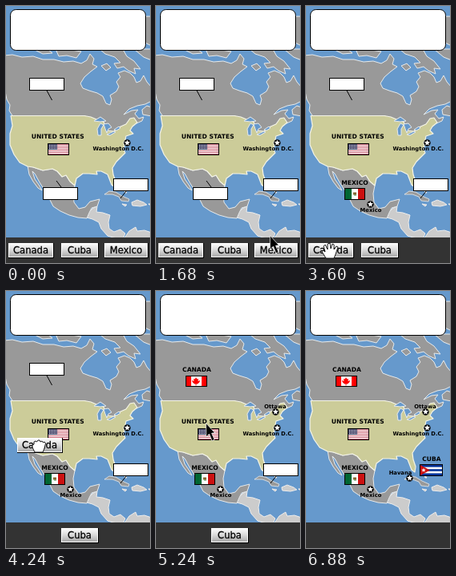
These frames come from a looping animation (180x322 px, 8.46 s). An HTML page with a canvas:

```html
<!DOCTYPE html>
<html lang="en">
<head>
<meta charset="utf-8">
<title>Map quiz</title>
<style>
html, body { margin: 0; width: 100%; height: 100%; overflow: hidden; background: #69c; }
canvas { display: block; width: 180px; height: 322px; }
</style>
</head>
<body>
<canvas id="stage" width="180" height="322"></canvas>
<script>
const ctx = document.getElementById('stage').getContext('2d');
const LOOP = 8460, STEP = 80;
const SEA = '#6699cc', LAND = '#999999', PALE = '#cccccc', HOVER = '#999966';
const FONT = '"DejaVu Sans", Verdana, sans-serif';

const shape = d => new Path2D(d);
const canada = shape(`M-2 62L8 61L20 64L34 63L46 67L60 67L72 70L84 69L94 72L101 68L105 60L110 66L108 73L114 76
  L106 82L98 89L93 97L96 103L104 106L114 109L121 113L125 122L130 124L132 117L130 112L138 107L141 101L138 95L143 89
  L140 84L148 81L155 84L160 89L163 96L168 94L172 87L176 95L182 102L182 119L174 123L164 125L154 129L147 136
  L157 131L165 130L161 135L166 141L172 139L170 144L163 147L158 142L150 148L136 158L127 160
  L113 145L98 137.5L8 137.5L4 131L5 124L1 117L-2 102Z`);
const arctic = shape(`M170 130L176 125L182 127L182 138L171 136Z
  M62 54L76 54L94 57L88 65L76 62L66 63ZM34 54L52 54L58 59L46 60Z
  M117 54L146 54L151 63L160 69L168 79L160 78L162 85L153 81L147 76L139 78L135 72L143 71L136 64L124 60Z
  M119 75L126 72L131 77L125 81ZM160 54L182 54L182 68L172 64ZM174 13L182 13L182 50L174 46Z`);
const usa = shape(`M6 137.5L98 137.5L106 139L113 142L122 145L126 156L135 157L141 152L150 148L155 141L160 140L164 146
  L158 151L155 156L159 160L150 163L149 168L147 171L148 176L146 178L149 184L143 190L138 195L133 203L134 211L137 220
  L136 227L132 224L127 211L119 207L113 207L114 211L104 210L96 210L88 216L86 225L80 220L75 212L70 214L64 207
  L58 204L46 206L34 202L27 201L17 196L10 186L5 174L5 160L8 150Z`);
const mexico = shape(`M27 200L34 202L46 206L58 204L64 207L70 214L75 212L80 220L86 225L84 235L85 246L91 254L99 252
  L105 245L117 242L114 251L107 253L104 259L101 266L90 265L79 262L68 257L59 251L55 243L49 232L42 221L36 210
  L33 207L36 217L41 224L45 231L40 228L34 220L29 211Z`);
const cuba = shape('M123 236L129 232L137 233L145 238L154 242L153 245L144 244L141 239L133 236Z');
const others = shape(`M101 265L104 258L109 253L114 251L113 258L121 259L130 262L128 271L129 279L135 283L143 280
  L149 285L146 292L134 290L127 288L119 279L116 271L108 267Z
  M147 292L154 282L162 277L164 282L173 281L182 284L182 292Z
  M157 246L164 243L172 246L176 249L168 251L158 250Z M145 248L151 249L149 251Z M178 248L182 248L181 250Z
  M143 222L145 225L144 228Z M148 230L151 234L149 234Z`);
const lakes = shape(`M110 144L118 139L125 144L118 145ZM115 162L114 154L118 147L122 149L119 154L119 162Z
  M122 148L128 147L132 152L128 154L126 159L124 154ZM126 161L135 157L137 158L130 162ZM135 155L141 151L143 153L138 156Z`);

const arrow = shape('M.5 1L.5 18L4.5 14.5L8 23L11 21.5L7.5 13.5L11.5 13Z');
const openHand = shape(`M-5 9L-10 1L-9 -1L-6 1L-8 -6L-6 -8L-3 -2L-3 -9L0 -10L1 -3L3 -9L5 -8L5 -2
  L8 -6L10 -5L7 4L5 9Z`);
const fist = shape('M-5 8L-8 2L-8 -1L-6 -2L-6 -5L-4 -6L-2.5 -5L-1 -7L1 -7L2 -5L4 -6L5.5 -4L7 -5L8.5 -3L7 3L5 8Z');

function fill(path, color, edge, width = 1) {
  ctx.fillStyle = color;
  ctx.fill(path);
  if (!edge) return;
  ctx.strokeStyle = edge;
  ctx.lineWidth = width;
  ctx.stroke(path);
}
function rect(x, y, w, h, color) {
  ctx.fillStyle = color;
  ctx.fillRect(x, y, w, h);
}
function text(s, x, y, size, weight = 'bold') {
  ctx.font = `${weight} ${size}px ${FONT}`;
  ctx.textAlign = 'center';
  ctx.fillStyle = '#000';
  ctx.fillText(s, x, y);
}
function at(x, y, draw) {
  ctx.save();
  ctx.translate(x, y);
  draw();
  ctx.restore();
}
function star(x, y, r, color) {
  ctx.beginPath();
  for (let i = 0; i < 10; i++) {
    const a = i * Math.PI / 5 - Math.PI / 2, d = i % 2 ? r * .45 : r;
    ctx.lineTo(x + d * Math.cos(a), y + d * Math.sin(a));
  }
  ctx.fillStyle = color;
  ctx.fill();
}
function city(name, x, y, tx, ty) {
  ctx.beginPath();
  ctx.arc(x, y, 4.2, 0, 7);
  ctx.fillStyle = '#000';
  ctx.fill();
  star(x, y, 3.8, '#fff');
  text(name, tx, ty, 6.8);
}
function slot(x, y, x1, y1, x2, y2) {
  ctx.strokeStyle = '#000';
  ctx.lineWidth = 1;
  ctx.beginPath();
  ctx.moveTo(x1, y1);
  ctx.lineTo(x2, y2);
  ctx.stroke();
  rect(x, y, 44, 16, '#000');
  rect(x + 1, y + 1, 42, 14, '#fff');
}
function stripes(w, h, n, color) {
  for (let i = 0; i < n; i += 2) rect(0, i * h / n, w, h / n, color);
}
function flag(x, y, w, h, draw) {
  rect(x, y, w, h, '#000');
  rect(x + 1, y + 1, w - 2, h - 2, '#fff');
  at(x + 1, y + 1, () => draw(w - 2, h - 2));
}
const flags = {
  usa(w, h) {
    stripes(w, h, 13, '#cc6677');
    rect(0, 0, 11, 7, '#446');
    for (let i = 0; i < 15; i++) rect(1 + i % 5 * 2, 1 + Math.floor(i / 5) * 2, 1, 1, '#dde');
  },
  canada(w, h) {
    rect(0, 0, 6, h, '#f00');
    rect(w - 6, 0, 6, h, '#f00');
    fill(shape('M12 1L13.3 3.5L15 3L14.5 6L17 5L16.5 7L14 9.5L12.4 9.5L12.4 11.5L11.6 11.5L11.6 9.5L10 9.5L7.5 7L7 5L9.5 6L9 3L10.7 3.5Z'), '#f00');
  },
  mexico(w, h) {
    rect(0, 0, w / 3, h, '#063');
    rect(w * 2 / 3, 0, w / 3, h, '#c11');
    rect(w / 2 - 2, h / 2 - 2, 4, 3, '#863');
    rect(w / 2 - 1, h / 2 + 1, 3, 1, '#484');
  },
  cuba(w, h) {
    stripes(w, h, 5, '#039');
    fill(shape(`M0 0L12 ${h / 2}L0 ${h}Z`), '#c11');
    star(4, h / 2, 2.8, '#fff');
  }
};
function button(name, x, y, w) {
  const g = ctx.createLinearGradient(0, y, 0, y + 18);
  g.addColorStop(0, '#fff');
  g.addColorStop(.5, '#d8d8d8');
  g.addColorStop(1, '#a4a4a4');
  rect(x, y, w + 1, 19, '#000');
  rect(x, y, w, 18, '#fff');
  rect(x + 1, y + 1, w - 2, 16, g);
  text(name, x + w / 2, y + 13, 11.6, 'normal');
  ctx.strokeStyle = '#000';
  ctx.lineWidth = .3;
  ctx.strokeText(name, x + w / 2, y + 13);
}

// Linear travel that advances once per step.
function travel(t, start, steps, x0, y0, x1, y1) {
  const k = Math.max(0, Math.min(steps, Math.floor((t - start) / STEP))) / steps;
  return [x0 + (x1 - x0) * k, y0 + (y1 - y0) * k];
}

const items = [
  { name: 'Canada', w: 56, grab: 3680, drop: 4920, path: [3680, 13, 3, 297, 23.5, 88] },
  { name: 'Cuba', w: 46, grab: 5800, drop: 6880, path: [5800, 11, 69, 297, 132, 214] },
  { name: 'Mexico', w: 54, grab: 1840, drop: 2680, path: [1840, 8, 123, 297, 42, 217] }
];
const moves = [
  [320, 1120, 10, 31, 41, 101, 201],
  [1120, 1760, 8, 101, 201, 148, 299],
  [2680, 2880, 1, 60, 231, 60, 231],
  [2880, 3600, 9, 60, 231, 29, 299],
  [4920, 5800, 11, 45, 88, 92, 299]
];

function drawMap(t) {
  const within = (a, b) => t >= a && t < b;
  const tint = on => on ? HOVER : LAND;
  const north = tint(within(320, 800) || within(4560, 4920));
  rect(0, 0, 180, 322, SEA);
  ctx.lineJoin = 'round';
  fill(canada, north, '#e6eaec');
  fill(arctic, north, '#e6eaec');
  fill(others, PALE, '#eee');
  fill(mexico, tint(within(2240, 2680)), '#e6eaec');
  fill(usa, '#cccc99', '#f4f4e8', 1.2);
  fill(lakes, SEA, '#e6eaec');
  fill(cuba, tint(within(6600, 6880)), '#e6eaec', .8);
}

function drawLabels(t) {
  text('UNITED STATES', 64.7, 166, 7.6);
  flag(52, 172, 27, 15, flags.usa);
  city('Washington D.C.', 151.5, 171.5, 140.3, 181);
  if (t < 2680) slot(46, 227, 69, 227, 63, 219);
  else {
    text('MEXICO', 61, 224, 7.6);
    flag(48, 228, 26, 15, flags.mexico);
    city('Mexico', 80.5, 248.5, 81, 258);
  }
  if (t < 4920) slot(29, 90, 50.5, 105, 57.5, 118);
  else {
    text('CANADA', 51, 101, 7.6);
    flag(37, 106, 27, 14, flags.canada);
    city('Ottawa', 149.5, 151.5, 149, 147);
  }
  if (t < 6880) slot(134, 216, 151, 231, 143, 241);
  else {
    text('CUBA', 157, 213, 7.6);
    flag(142, 217, 29, 15, flags.cuba);
    city('Havana', 129.5, 234.5, 118, 230);
  }
}

function drawPanels() {
  rect(0, 290, 180, 32, '#333');
  ctx.beginPath();
  ctx.roundRect(5.5, 4.5, 169, 51, 7);
  ctx.fillStyle = '#fff';
  ctx.fill();
  ctx.strokeStyle = '#000';
  ctx.lineWidth = 1;
  ctx.stroke();
}

function drawPointer(t) {
  for (const [from, to, ...rest] of moves) {
    if (t >= from && t < to) at(...travel(t, from, ...rest), () => fill(arrow, '#000', '#fff', .7));
  }
}

function drawButtons(t) {
  for (const { name, w, grab, drop, path } of items) {
    if (t >= drop) continue;
    const [x, y] = travel(t, ...path).map(Math.round);
    button(name, x, y, w);
    const hand = t >= grab ? fist : openHand;
    if (t >= grab - STEP && !(name === 'Cuba' && t < grab))
      at(x + w / 2 - 1, y + 10, () => fill(hand, '#fff', '#000', .9));
  }
}

function frame(now) {
  const t = now % LOOP;
  drawMap(t);
  drawLabels(t);
  drawPanels();
  drawButtons(t);
  drawPointer(t);
  requestAnimationFrame(frame);
}
requestAnimationFrame(frame);
</script>
</body>
</html>
```
